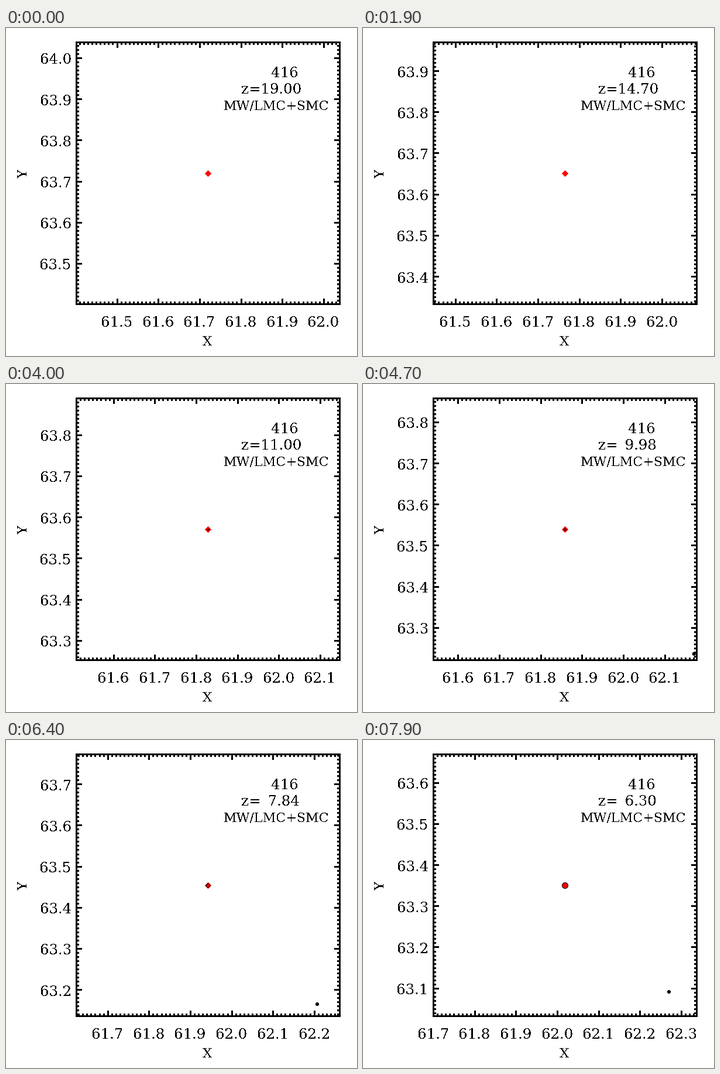
A matplotlib script that plays this animation: 600x560 px, repeating every 8000 ms.

```python
import numpy as np
import matplotlib.pyplot as plt
from matplotlib.animation import FuncAnimation
from matplotlib.collections import LineCollection
from matplotlib.patches import Circle, Polygon

W, H, DPI = 600, 560, 100
PX = 72 / DPI                       # points per pixel
FRAMES, STEP = 80, 100
LEFT, RIGHT, TOP, BOTTOM = 120.5, 570.5, 24.5, 471.5
CX, CY = 345.5, 248.0
SPAN = 0.6368                       # data range of both axes
MAJOR, MINOR = 9, 4.5               # tick lengths

# Track of the main halo, which always sits at the centre of the view
KEYS = np.array([0, 19, 29, 40, 53, 64, 79])
REDSHIFT = np.array([19.00, 14.70, 12.81, 11.00, 9.17, 7.84, 6.30])
HALO_X = np.array([61.720, 61.765, 61.7928, 61.8283, 61.8873, 61.9425, 62.0182])
HALO_Y = np.array([63.720, 63.6515, 63.613, 63.571, 63.511, 63.4545, 63.351])
RADIUS = np.array([0, 0.4, 1.0, 1.2, 2.1, 3.2, 5.0])

# Satellite offset from the centre, in pixels
SAT_X = np.polyfit(KEYS[4:], [205.5, 186.5, 177.5], 2)
SAT_Y = np.polyfit(KEYS[4:], [211, 203, 182], 2)


def smooth(n, values):
    """Cubic Hermite interpolation through the keys."""
    slopes = np.gradient(values, KEYS, edge_order=2)
    i = min(np.searchsorted(KEYS, n, side="right") - 1, len(KEYS) - 2)
    h = KEYS[i + 1] - KEYS[i]
    t = (n - KEYS[i]) / h
    return ((1 + 2 * t) * (1 - t) ** 2 * values[i]
            + t * (1 - t) ** 2 * h * slopes[i]
            + t * t * (3 - 2 * t) * values[i + 1]
            + t * t * (t - 1) * h * slopes[i + 1])


def redshift(n):
    return np.exp(np.interp(n, KEYS, np.log(1 + REDSHIFT))) - 1


def ticks(centre, length):
    """Index in hundredths and offset in pixels of each tick in view."""
    lo, hi = centre - SPAN / 2, centre + SPAN / 2
    idx = np.arange(np.ceil(lo * 100), np.floor(hi * 100) + 1).astype(int)
    return idx, (idx / 100 - centre) * length / SPAN


def snap(v):
    return np.floor(v) + 0.5


fig = plt.figure(figsize=(W / DPI, H / DPI), dpi=DPI, facecolor="white")
ax = fig.add_axes([0, 0, 1, 1])
ax.set(xlim=(0, W), ylim=(H, 0))
ax.axis("off")


def label(x, y, s="", size=24.4, **kw):
    return ax.text(x, y, s, family="DejaVu Serif", fontsize=size * PX,
                   color="black", va="baseline", antialiased=False, **kw)


def strokes(segments):
    lines = LineCollection(segments, colors="black", linewidths=3 * PX,
                           antialiaseds=False, snap=False)
    return ax.add_collection(lines)


strokes([[(LEFT - 1.5, y), (RIGHT + 1.5, y)] for y in (TOP, BOTTOM)]
        + [[(x, TOP), (x, BOTTOM)] for x in (LEFT, RIGHT)])
tick_lines = strokes([])

label(453, 84, "416")
z_text = label(402, 112)
label(372, 140, "MW/LMC+SMC", size=22.1)
label(344.5, 542, "X", size=23, ha="center")
label(36, 248.5, "Y", size=23, ha="center", rotation=90,
      rotation_mode="anchor")
x_labels = [label(0, 510, ha="center") for _ in range(8)]
y_labels = [label(112, 0, ha="right") for _ in range(8)]

MX, MY, R = CX, CY + 0.5, 5.6
ax.add_patch(Polygon([(MX - R, MY), (MX, MY - R), (MX + R, MY), (MX, MY + R)],
                     fc="red", ec="none", zorder=3))
halo = Circle((MX, MY), 1, fc="red", ec="black", lw=PX, zorder=4)
satellite = Circle((0, 0), 3.1, fc="black", ec="none", zorder=4)
ax.add_patch(halo)
ax.add_patch(satellite)


def update(n):
    segments = []
    for text in x_labels + y_labels:
        text.set_visible(False)

    idx, off = ticks(smooth(n, HALO_X), RIGHT - LEFT)
    free = iter(x_labels)
    for i, x in zip(idx, CX + off):
        major = i % 10 == 0
        size = MAJOR if major else MINOR
        sx = snap(x)
        segments += [[(sx, BOTTOM), (sx, BOTTOM - size)],
                     [(sx, TOP), (sx, TOP + size)]]
        if major:
            next(free).set(x=x - 0.5, text=f"{i / 100:.1f}", visible=True)

    idx, off = ticks(smooth(n, HALO_Y), BOTTOM - TOP)
    free = iter(y_labels)
    for i, y in zip(idx, CY - off):
        major = i % 10 == 0
        size = MAJOR if major else MINOR
        sy = snap(y)
        segments += [[(LEFT, sy), (LEFT + size, sy)],
                     [(RIGHT, sy), (RIGHT - size, sy)]]
        if major:
            # end labels stay within the height of the box
            base = np.clip(y + 10, TOP + 18, BOTTOM + 0.5)
            next(free).set(y=base, text=f"{i / 100:.1f}", visible=True)
    tick_lines.set_segments(segments)

    z = f"{redshift(n):5.2f}".replace(" ", "\u2002")
    z_text.set_text("z=" + z)

    r = np.interp(n, KEYS, RADIUS)
    halo.set_radius(r)
    halo.set_visible(r > 0.6)

    dx, dy = np.polyval(SAT_X, n), np.polyval(SAT_Y, n)
    satellite.center = CX + dx, CY + dy
    satellite.set_visible(bool(n > KEYS[3] and dx < RIGHT - CX
                               and dy < BOTTOM - CY))
    return []


anim = FuncAnimation(fig, update, frames=FRAMES, interval=STEP,
                     init_func=lambda: [], repeat=True, repeat_delay=0,
                     blit=False)
plt.show()
```
